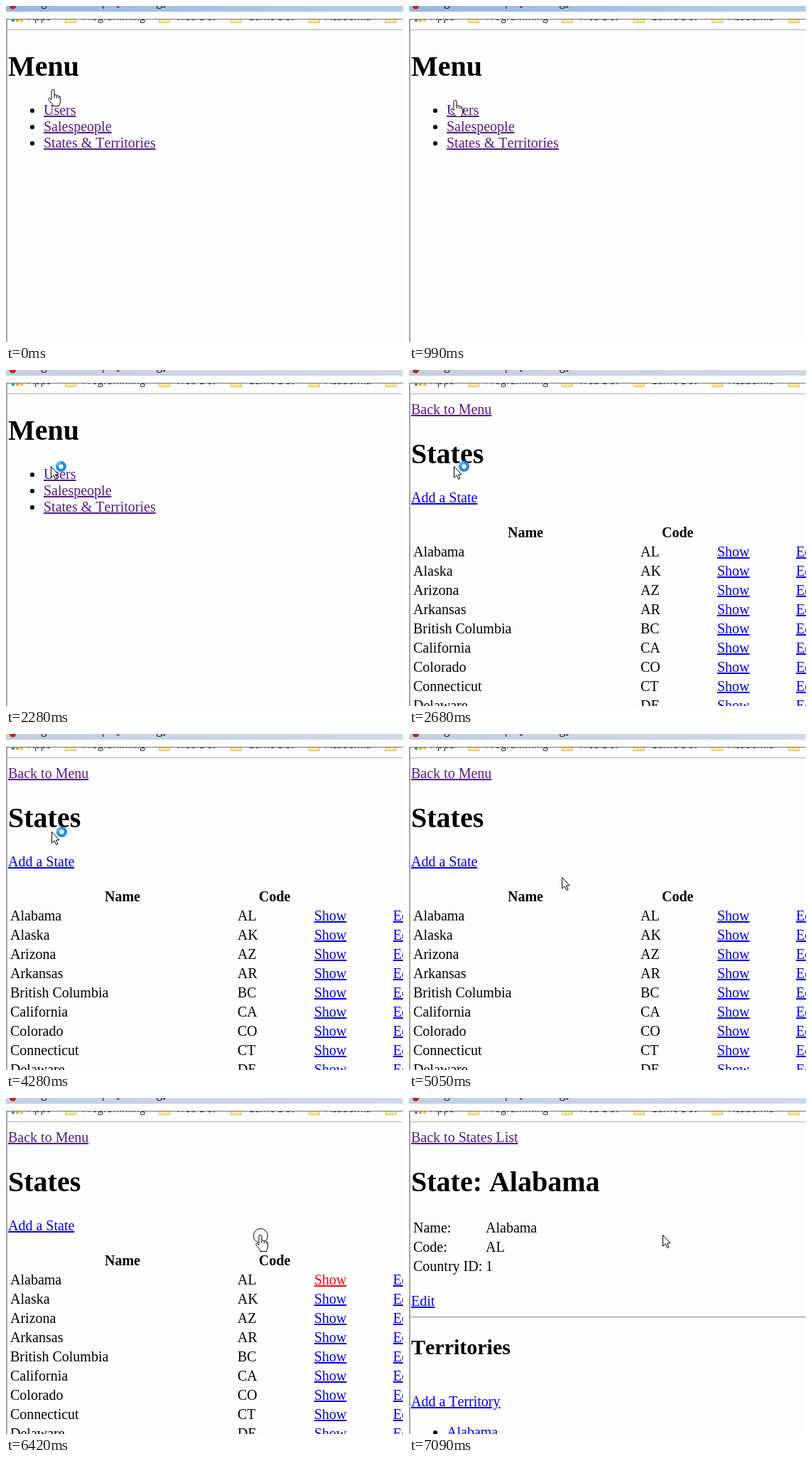
These frames come from a looping animation (559x472 px, 8 s). An HTML page:

```html
<!DOCTYPE html>
<html lang="en">
<head>
<meta charset="utf-8">
<title>Menu walkthrough</title>
<style>
  html, body { margin: 0; width: 100%; height: 100%; overflow: hidden; background: #fdfdfd; }
  svg { display: block; }
  .page text { font: 20px "Liberation Serif", "Times New Roman", serif; font-kerning: none; white-space: pre; }
  .page .b { font-weight: bold; }
  .page .h1 { font-size: 40px; font-weight: bold; }
  .page .h2 { font-size: 30px; font-weight: bold; }
  .link, .seen { text-decoration: underline; fill: #00e; }
  .seen { fill: #551a8b; }
  .active { fill: #f00; }
  .bar text { font: 14px "Open Sans", "Noto Sans", sans-serif; fill: #222; }
  .bar .title { font-size: 15.5px; }
</style>
</head>
<body>
<svg width="559" height="472" viewBox="0 0 559 472">
  <defs>
    <linearGradient id="focused"><stop stop-color="#9bb8d9"/><stop offset="1" stop-color="#b3cde8"/></linearGradient>
    <linearGradient id="blurred"><stop stop-color="#c2d1e2"/><stop offset="1" stop-color="#cddae9"/></linearGradient>
    <clipPath id="strip"><path d="M0 19H559V33H0Z"/></clipPath>
  </defs>
  <g class="bar">
    <rect id="titleBar" width="559" height="8"/>
    <circle cx="9.5" cy="0" r="4.5" fill="#d01818"/>
    <text class="title" x="22" y="0">Image Workshop</text>
    <text class="title" x="155" y="0">[Running]</text>
    <g id="bookmarks" clip-path="url(#strip)"></g>
    <path d="M0 18.5H559" stroke="#777"/>
    <path d="M1 18V472" stroke="#808080" stroke-width="1.4"/>
    <path d="M2 33.5H559" stroke="#b4b4b4"/>
  </g>
  <g class="page" id="menu"></g>
  <g class="page" id="states"></g>
  <g class="page" id="detail"></g>
  <g id="cursor" stroke="#000" fill="#fff" stroke-linejoin="round">
    <circle id="click" cx=".5" cy="1.5" r="10" fill="none"/>
    <g id="hand">
      <path d="M-2 13V2.5a2 2 0 0 1 4 0V8q2-1 3.4.8q2-.7 3 1q2.2-.2 2.3 2V17q0 2.5-1.8 4.5V23.5H0V21.5L-5.5 15.5q-1.5-2 .2-3q1.5-.6 3.3 2.2Z"/>
      <path d="M2 8V12M5.4 9V12.5M8.4 10V13" fill="none"/>
    </g>
    <path id="arrow" d="M.5 .5V16.2L4.2 12.8L6.7 18.5L9 17.5L6.6 11.9H11Z"/>
    <g id="busy" fill="none" transform="translate(14.5 .5)">
      <circle r="5.4" fill="#fff" stroke="#1e8fe8" stroke-width="4.4"/>
      <path d="M-5.4 0A5.4 5.4 0 0 1 0 -5.4" stroke="#53b4f6" stroke-width="3"/>
    </g>
  </g>
</svg>
<script>
const $ = id => document.getElementById(id);
const text = (x, y, str, cls = "", id = "") =>
  `<text x="${x}" y="${y}" class="${cls}" id="${id}">${str}</text>`;
const bullet = y => `<circle cx="37" cy="${y - 6}" r="3.1"/>`;
const row = (y, ...cells) => cells.map(([x, str, cls, id]) => text(x, y, str, cls, id)).join("");

const folder = x => `<path d="M${x + .5} 10H${x + 15.5}V23.5H${x + .5}Z" fill="#fbe596" stroke="#e3bf5c"/>`;
$("bookmarks").innerHTML =
  ["#2f9e58", "#e8a317", "#f4c020"].map((c, i) =>
    `<rect x="${8 + 6 * i}" y="18" width="4" height="4" fill="${c}"/>`).join("") +
  text(31, 20, "Apps") +
  [[83, "Programming"], [215, "Web Dev"], [316, "Game Dev"], [426, "Academia"], [534, ""]]
    .map(([x, name]) => folder(x) + text(x + 24, 20, name)).join("");

$("menu").innerHTML = text(3, 98, "Menu", "h1") +
  ["Users", "Salespeople", "States &amp; Territories"].map((name, i) =>
    bullet(153 + 23 * i) + text(53, 153 + 23 * i, name, "seen", "menu" + i)).join("");

const states = ["Alabama AL", "Alaska AK", "Arizona AZ", "Arkansas AR", "British Columbia BC",
  "California CA", "Colorado CO", "Connecticut CT", "Delaware DE"];
$("states").innerHTML = text(3, 62, "Back to Menu", "seen") + text(3, 131, "States", "h1") +
  text(3, 186, "Add a State", "link") + row(235, [139, "Name", "b"], [356, "Code", "b"]) +
  states.map((s, i) => row(262 + 27 * i, [6, s.slice(0, -3)], [326, s.slice(-2)],
    [434, "Show", "link", "show" + i], [545, "Edit", "link"])).join("");

$("detail").innerHTML = text(3, 62, "Back to States List", "seen") +
  text(3, 131, "State: Alabama", "h1") +
  row(189, [6, "Name:"], [108, "Alabama"]) + row(216, [6, "Code:"], [108, "AL"]) +
  row(243, [6, "Country ID:"], [108, "1"]) + text(3, 292, "Edit", "link") +
  `<path d="M3 307.5H559" stroke="#929292"/><path d="M3 308.5H559" stroke="#eee"/>` +
  text(3, 360, "Territories", "h2") + text(3, 433, "Add a Territory", "link") +
  bullet(476) + text(53, 476, "Alabama", "link");

// Pointer steps: time, x, y, shape
const steps = [
  [0, 66, 117, "hand"], [860, 66, 124, "hand"], [990, 65, 132, "hand"], [1140, 64, 135, "hand"],
  [2160, 63, 135, "busy"], [2940, 64, 135, "hand"], [4280, 64, 137, "busy"],
  [4400, 76, 151, "busy"], [4540, 122, 171, "busy"], [4660, 175, 190, "busy"],
  [4810, 195, 196, "arrow"], [4930, 208, 200, "arrow"], [5050, 215, 201, "arrow"],
  [5200, 226, 203, "arrow"], [5320, 252, 204, "arrow"], [5440, 284, 203, "arrow"],
  [5570, 314, 201, "arrow"], [5690, 336, 199, "arrow"], [5830, 350, 195, "arrow"],
  [5960, 358, 192, "hand"], [6940, 357, 192, "arrow"]
];
const show = (id, on) => $(id).style.display = on ? "" : "none";

function draw(now) {
  const t = now % 8000, during = (from, to) => t >= from && t < to;
  $("titleBar").setAttribute("fill", `url(#${t < 1450 ? "focused" : "blurred"})`);
  show("menu", t < 2680);
  show("states", during(2680, 7090));
  show("detail", t >= 7090);
  $("menu2").classList.toggle("active", during(1570, 1720));
  $("show0").classList.toggle("active", during(6420, 6540));

  const [, x, y, shape] = steps.findLast(s => s[0] <= t);
  $("cursor").setAttribute("transform", `translate(${x} ${y})`);
  show("hand", shape === "hand");
  show("arrow", shape !== "hand");
  show("busy", shape === "busy");
  show("click", during(1450, 1720) || during(6420, 6540));
  requestAnimationFrame(draw);
}
draw(0);
</script>
</body>
</html>
```
